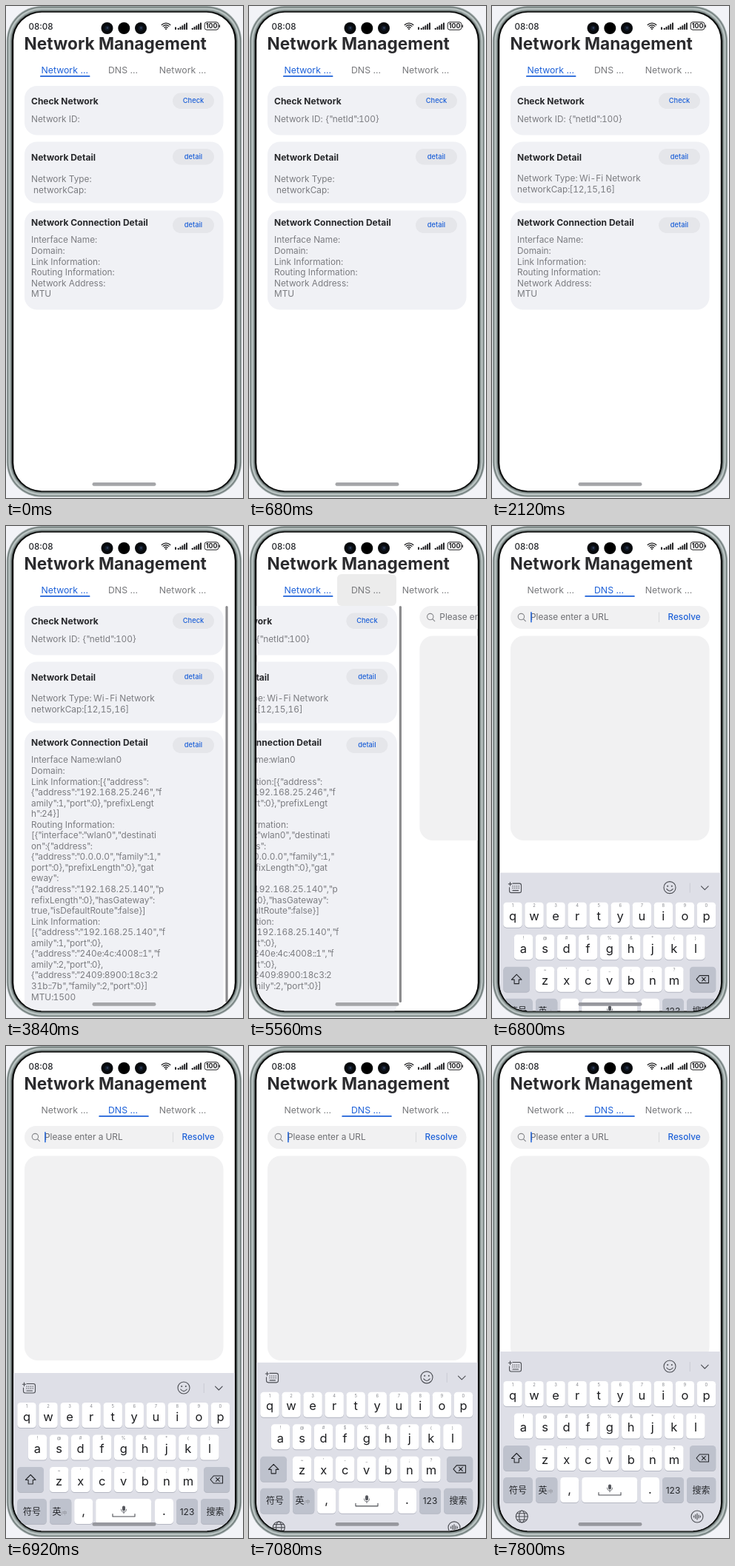
Write an HTML page that moves like this. It is 320 px wide and 665 px high and loops after 8000 ms.

```html
<!DOCTYPE html>
<html lang="en">
<head>
<meta charset="utf-8">
<title>Network Management</title>
<style>
html, body { margin: 0; width: 100%; height: 100%; overflow: hidden; background: #f2f3f7; }
svg { display: block; width: 100vw; height: 100vh; }
text { font-family: Inter, Roboto, "Noto Sans CJK SC", "Noto Sans CJK", sans-serif; white-space: pre; }
.title { font-size: 22.65px; font-weight: 700; fill: #2b2b2e; }
.tab { font-size: 12.3px; fill: #77787b; }
.head { font-size: 12px; font-weight: 700; fill: #27282b; }
.body { font-size: 11.85px; fill: #7b7c80; font-variant-numeric: tabular-nums; }
.tight { letter-spacing: -0.9px; }
.btn { font-size: 9.3px; font-weight: 500; fill: #1c60d8; }
.link { font-size: 11.7px; font-weight: 500; fill: #1c60d8; }
.key { font-size: 16.5px; fill: #1d1e21; }
.fn { font-size: 12px; fill: #24262a; }
.hint { font-size: 5.8px; fill: #85878d; }
.mid { text-anchor: middle; }
.line { fill: none; stroke: #4b4d53; stroke-width: 1.1; stroke-linecap: round; stroke-linejoin: round; }
</style>
</head>
<body>
<svg id="stage" viewBox="0 0 320 665"></svg>
<script>
const BLUE = '#1c60d8';
const PAGE = 299;
const KEYBOARD_TOP = 413;
const LOOP = 8000;
const LINE = 14.55;

const rect = (x, y, w, h, r, fill, extra = '') =>
  `<rect x="${x}" y="${y}" width="${w}" height="${h}" rx="${r}" fill="${fill}" ${extra}/>`;
const circle = (x, y, r, fill, extra = '') =>
  `<circle cx="${x}" cy="${y}" r="${r}" fill="${fill}" ${extra}/>`;
const text = (x, y, cls, str, extra = '') =>
  `<text x="${x}" y="${y}" class="${cls}" ${extra}>${str}</text>`;
const path = (d, extra = '') => `<path class="line" d="${d}" ${extra}/>`;
const group = (id, inner, extra = '') => `<g id="${id}" ${extra}>${inner}</g>`;
// quotes and colons sit close to their neighbours
const tighten = str => str.replace(/[":]+/g, m => `<tspan class="tight">${m}</tspan>`);
const body = (x, y, str) => text(x, y, 'body', tighten(str));
const lines = list => list.map((s, i) => body(34, 320.4 + i * LINE, s)).join('');

const emptyLines = ['Interface Name:', 'Domain:', 'Link Information:',
  'Routing Information:', 'Network Address:', 'MTU'];
const fullLines = ['Interface Name:wlan0', 'Domain:', 'Link Information:[{"address":',
  '{"address":"192.168.25.246","f', 'amily":1,"port":0},"prefixLengt', 'h":24}]',
  'Routing Information:', '[{"interface":"wlan0","destinati', 'on":{"address":',
  '{"address":"0.0.0.0","family":1,"', 'port":0},"prefixLength":0},"gat', 'eway":',
  '{"address":"192.168.25.140","p', 'refixLength":0},"hasGateway":',
  'true,"isDefaultRoute":false}]', 'Link Information:',
  '[{"address":"192.168.25.140","f', 'amily":1,"port":0},',
  '{"address":"240e:4c:4008::1","f', 'amily":2,"port":0},',
  '{"address":"2409:8900:18c3:2', '31b::7b","family":2,"port":0}]', 'MTU:1500'];

const screenShape = rect(10.2, 8.8, 298.6, 646.4, 38, '#fff');

function phone() {
  const shell = (inset, fill) =>
    rect(inset, inset - 0.8, 319 - 2 * inset, 665.4 - 2 * inset, 48 - inset, fill);
  return shell(0.8, '#a3adad') + shell(1.8, '#717c7b') + shell(3.2, '#b9c3c2')
    + shell(5.6, '#8c9796') + shell(7.2, '#4a5251') + shell(8.1, '#080909') + screenShape;
}

function bars(x, step, n) {
  let s = '';
  for (let i = 0; i < n; i++) {
    const h = 2.2 + i * 7.3 / (n - 1);
    s += rect(x + i * step, 32 - h, 1.9, h, 0.4, '#1c1c1e');
  }
  return s;
}

function statusBar() {
  const wave = r => {
    const d = r * 0.72;
    return path(`M${216 - d} ${31.3 - d}A${r} ${r} 0 0 1 ${216 + d} ${31.3 - d}`,
      'style="stroke:#1c1c1e;stroke-width:1.3"');
  };
  const lens = x => circle(x, 30, 8, '#080a0d') + circle(x, 30, 3.4, '#121a28')
    + circle(x + 0.4, 29.6, 1.3, '#33435f');
  return text(30.5, 31.6, 'fn', '08:08', 'style="font-size:11.6px;font-weight:500"')
    + lens(136.5) + circle(159.3, 30, 8, '#000') + lens(182)
    + wave(8) + wave(5.4) + wave(2.8) + circle(216, 31, 1.1, '#1c1c1e')
    + rect(228, 28.5, 2, 3.5, 0.4, '#1c1c1e') + bars(231.8, 2.8, 5) + bars(250.8, 2.8, 5)
    + rect(268.2, 21.8, 18.6, 10.4, 2.8, 'none', 'stroke="#1c1c1e"') + rect(287.7, 25.2, 1.3, 3.8, 0.6, '#1c1c1e')
    + text(277.5, 30.3, 'mid', '100', 'style="font-size:8.8px;font-weight:700" fill="#1c1c1e"');
}

function header() {
  return text(24.6, 59.3, 'title', 'Network Management')
    + group('tabPress', rect(119, 65, 80, 43, 6, '#ececec'))
    + text(47.5, 91.2, 'tab', 'Network ...', 'id="tabA"')
    + text(138, 91.2, 'tab', 'DNS ...', 'id="tabB"')
    + text(206.8, 91.2, 'tab', 'Network ...')
    + rect(46, 94, 67.5, 1.8, 0.9, BLUE, 'id="underline"');
}

function button(id, y, label) {
  return rect(225, y, 56, 21.5, 10.75, '#e5e6ea')
    + rect(225, y, 56, 21.5, 10.75, '#000', `id="${id}" opacity="0"`)
    + text(253, y + 13.8, 'btn mid', label);
}

function networkPage() {
  const card = (y, h, extra) => rect(25, y, 268.5, h, 17, '#f0f1f5', extra);
  return card(108, 66.5) + text(34, 133, 'head', 'Check Network') + button('press1', 117.5, 'Check')
    + body(34, 157, 'Network ID:') + group('netId', body(103.5, 157, '{"netId":100}'))
    + card(183.5, 83) + text(34, 208.8, 'head', 'Network Detail') + button('press2', 193, 'detail')
    + group('typeEmpty', body(34, 238.4, 'Network Type:') + body(37, 253, 'networkCap:'))
    + group('typeFull', body(34, 237.4, 'Network Type: Wi-Fi Network')
      + body(34, 251.8, 'networkCap:[12,15,16]'))
    + card(276.5, 134, 'id="linkCard"') + text(34, 296.6, 'head', 'Network Connection Detail')
    + button('press3', 285.5, 'detail')
    + group('linkEmpty', lines(emptyLines)) + group('linkFull', lines(fullLines))
    + rect(296.4, 108, 3.2, 536, 1.6, '#8c8c8e', 'id="scroll"');
}

function dnsPage() {
  return rect(25, 108, 268.5, 31, 15.5, '#f1f1f2')
    + circle(39.4, 122.6, 4.2, 'none', 'stroke="#85868a" stroke-width="1.1"')
    + path('M42.6 125.8L45.4 128.6', 'style="stroke:#85868a"')
    + text(52, 127.2, 'body', 'Please enter a URL', 'style="fill:#6d6e72"')
    + rect(52.2, 116, 1.5, 14.5, 0.7, BLUE, 'id="caret"')
    + rect(225, 116.5, 1, 13.5, 0, '#d9dadc')
    + text(237.6, 127.2, 'link', 'Resolve')
    + rect(25, 148.5, 268.5, 276.5, 18, '#f1f1f2');
}

function keyBox(x, y, w, fill) {
  return rect(x, y + 1, w, 34, 4.5, '#b4b7c2') + rect(x, y, w, 34, 4.5, fill);
}

function letterRow(x, y, letters, hints) {
  return [...letters].map((c, i) => {
    const cx = x + i * 29.05;
    const hint = hints[i].replace('&', '&amp;');
    return keyBox(cx - 12.7, y, 25.4, '#fff')
      + text(cx, y + 6.8, 'hint mid', hint) + text(cx, y + 24.6, 'key mid', c);
  }).join('');
}

function keyboard() {
  const grey = '#bec2cd';
  const label = (x, w, str, fill = grey, cls = 'fn') =>
    keyBox(x, 583, w, fill) + text(x + w / 2, 604.6, cls + ' mid', str);
  const dots = [0, 1, 2, 3].map(i => rect(27.5 + i * 2.7, 430.6, 1.2, 1.2, 0, '#4b4d53')
    + rect(27.5 + i * 2.7, 433.2, 1.2, 1.2, 0, '#4b4d53')).join('');
  const voice = [2, 5, 8, 4, 2].map((h, i) => {
    const x = 272.6 + i * 2.2;
    return path(`M${x} ${636 - h / 2}V${636 + h / 2}`);
  }).join('');

  return rect(10, KEYBOARD_TOP, PAGE, 260, 0, '#dedfe7')
    + path('M28 427.5H37Q39.5 427.5 39.5 430V437.5Q39.5 440 37 440H26Q23.5 440 23.5 437.5V433') + dots
    + path('M28 437H35.5') + path('M24.5 426V430.4M22.3 428.2H26.7')
    + circle(240, 433, 8, 'none', 'class="line"') + circle(237.2, 431, 1, '#4b4d53')
    + circle(242.8, 431, 1, '#4b4d53') + path('M235.8 435Q240 440.2 244.2 435')
    + rect(266.8, 427, 0.8, 13, 0, '#c5c7cf') + path('M282.5 431.2L287.3 436L292.1 431.2')
    + letterRow(28, 453, 'qwertyuiop', '1234567890')
    + letterRow(42.5, 496.5, 'asdfghjkl', '!@#$%&*()')
    + letterRow(71.6, 540, 'zxcvbnm', "~'-_:;?")
    + keyBox(15.3, 540, 35.7, grey)
    + path('M33.2 550.5L40 557.5H36.3V563H30.1V557.5H26.4Z', 'style="stroke:#24262a"')
    + keyBox(267, 540, 35.2, grey)
    + path('M280.3 552H292.5V562H280.3L276 557ZM283.5 554.6L288.3 559.4M288.3 554.6L283.5 559.4', 'style="stroke:#24262a"')
    + label(15.3, 39.5, '符号')
    + keyBox(59, 583, 29.3, grey) + text(62.5, 604.6, 'fn', '英') + text(74.5, 603.6, 'hint', '/中')
    + label(92.2, 25, ',', '#fff', 'key') + keyBox(121.2, 583, 75, '#fff')
    + rect(157, 592.5, 4, 7, 2, '#55575d') + path('M155.5 597.2Q155.5 601 159 601Q162.5 601 162.5 597.2M159 601V602.8', 'style="stroke-width:.8"')
    + path('M144 603.5V607H174V603.5')
    + label(201, 25, '.', '#fff', 'key') + label(230, 29, '123') + label(263, 39.2, '搜索')
    + circle(40.3, 636, 8, 'none', 'class="line"')
    + '<ellipse cx="40.3" cy="636" rx="3.7" ry="8" class="line"/>' + path('M32.3 636H48.3M33.6 631.8H47M33.6 640.2H47')
    + circle(277, 636, 8, 'none', 'class="line"') + voice;
}

document.getElementById('stage').innerHTML = `
  <defs>
    <clipPath id="screen">${screenShape}</clipPath>
    <clipPath id="pages">${rect(10, 107, PAGE, 560, 0, '#fff')}</clipPath>
  </defs>
  ${phone()}
  <g clip-path="url(#screen)">
    ${statusBar()}${header()}
    <g clip-path="url(#pages)">${group('pageA', networkPage())}${group('pageB', dnsPage())}</g>
    ${group('keyboard', keyboard())}
    ${rect(116.5, 644, 86, 4.8, 2.4, '#a5a6a9', 'id="homeBar"')}
  </g>`;

const $ = id => document.getElementById(id);
const set = (id, name, value) => $(id).setAttribute(name, value);
const show = (id, on) => set(id, 'visibility', on ? 'visible' : 'hidden');
const clamp = v => Math.max(0, Math.min(1, v));
const ramp = (t, a, b) => clamp((t - a) / (b - a));
const smooth = u => u * u * (3 - 2 * u);
const easeOut = u => 1 - (1 - u) ** 3;
const pulse = (t, a, b) => Math.min(ramp(t, a - 40, a + 40), 1 - ramp(t, b - 80, b));

function draw(t) {
  set('press1', 'opacity', 0.1 * pulse(t, 480, 680));
  set('press2', 'opacity', 0.1 * pulse(t, 1800, 2120));
  set('press3', 'opacity', 0.1 * pulse(t, 3640, 3840));

  show('netId', t >= 560);
  const typed = t >= 1920;
  show('typeEmpty', !typed);
  show('typeFull', typed);
  const linked = t >= 3720;
  show('linkEmpty', !linked);
  show('linkFull', linked);
  set('linkCard', 'height', linked ? 386 : 134);
  set('scroll', 'opacity', ramp(t, 3680, 3760));

  // page swipe and tab underline
  const x = PAGE * smooth(ramp(t, 5440, 5762));
  set('pageA', 'transform', `translate(${-x} 0)`);
  set('pageB', 'transform', `translate(${PAGE - x} 0)`);
  set('tabPress', 'opacity', Math.min(ramp(t, 5320, 5440), 1 - ramp(t, 5760, 6000)));
  set('underline', 'x', 46 + 79.3 * smooth(ramp(t, 5600, 5800)));
  const second = t >= 5640;
  $('tabA').style.fill = second ? '' : BLUE;
  $('tabB').style.fill = second ? BLUE : '';

  // keyboard rises, rests briefly, then settles
  const y = 242 - 213 * easeOut(ramp(t, 6680, 6920)) - 29 * easeOut(ramp(t, 7000, 7400));
  set('keyboard', 'transform', `translate(0 ${y})`);
  show('keyboard', t > 6680);
  show('caret', t >= 6640);
  set('homeBar', 'fill', t >= 6720 ? '#97989e' : '#a5a6a9');
}

const start = performance.now();
function tick() {
  const t = (performance.now() - start) % LOOP;
  draw(Math.floor(t / 40) * 40);
  requestAnimationFrame(tick);
}
draw(0);
requestAnimationFrame(tick);
</script>
</body>
</html>
```
